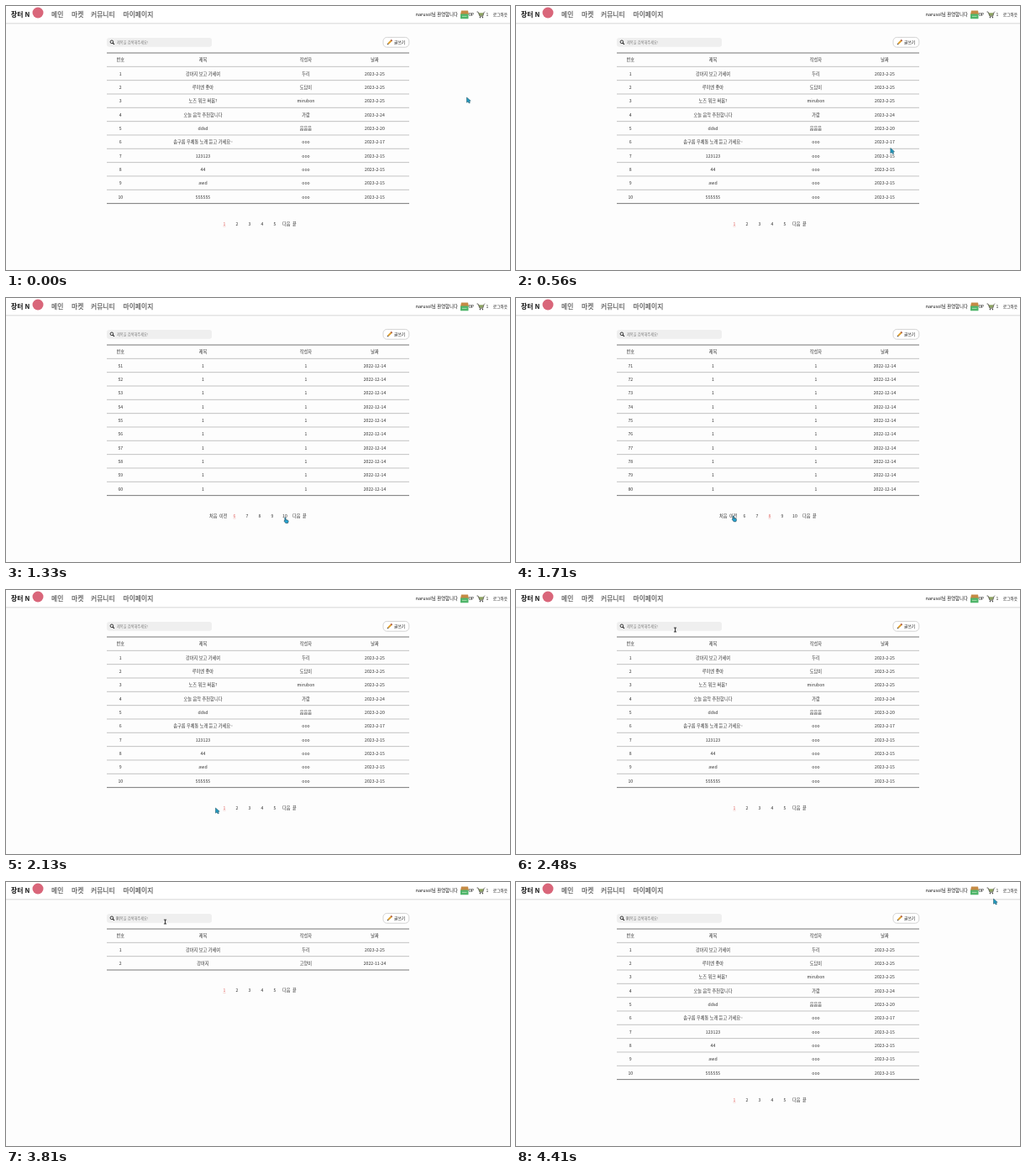
Animation, 600 px wide and 315 px high, one loop 4430 ms. Source, as an HTML page:

```html
<!DOCTYPE html>
<html lang="ko">
<head>
<meta charset="utf-8">
<title>게시판</title>
<style>
  html, body { margin: 0; width: 100%; height: 100%; overflow: hidden; background: #fdfdfd; }
  svg { display: block; width: 600px; height: 315px; }
  text { font-family: "Noto Sans CJK KR", "Noto Sans CJK", "Noto Sans", sans-serif; fill: #333; }
  .nav { font-weight: 900; fill: #707070; }
  .brand { font-weight: 900; fill: #111; }
  .bold { font-weight: 500; fill: #111; }
  .hint { fill: #808080; }
  .active { fill: #e0605c; }
</style>
</head>
<body>
<svg id="stage" viewBox="0 0 600 315">
  <rect width="600" height="20.5" fill="#fff"/>
  <path d="M0 20.8H600" stroke="#d8d8d8"/>
  <circle cx="38" cy="8" r="6.5" fill="#d9667a"/>

  <!-- wallet -->
  <path d="M542 5.5h8l1 4.5h-10z" fill="#c58a45"/>
  <rect x="541" y="9.5" width="9.5" height="5.8" rx=".6" fill="#4fb56a"/>
  <path d="M543 12.4h5.5" stroke="#a5dba9"/>

  <!-- cart -->
  <path d="M562.5 8.2h6l-1 3.6h-3.8z" fill="#8fa564"/>
  <path d="M560.5 7h1.5l2 5.2h3.6l1.5-4.6.9-1" fill="none" stroke="#4b4b43" stroke-width=".8"/>
  <circle cx="564.4" cy="13.6" r=".8" fill="#444"/>
  <circle cx="567.4" cy="13.6" r=".8" fill="#444"/>

  <!-- search field -->
  <rect x="120" y="38" width="125" height="10.8" rx="3" fill="#efefef"/>
  <circle cx="125.9" cy="42.8" r="1.8" fill="none" stroke="#222" stroke-width=".9"/>
  <path d="M127.2 44.2l1.7 1.7" stroke="#222" stroke-width="1.1"/>

  <!-- write button -->
  <rect x="449" y="37.4" width="30.8" height="11.8" rx="4.5" fill="#fff" stroke="#c9c9c9" stroke-width=".8"/>
  <path d="M455 45l4-4" stroke="#e0a030" stroke-width="2"/>
  <path d="M458.5 41.5l1-1" stroke="#a8584c" stroke-width="2"/>
  <path d="M453.8 46.2l.4-1.8 1.4 1.4z" fill="#333"/>

  <g id="labels"></g>
  <g id="views"></g>
  <g id="field"></g>

  <g id="cursor">
    <path id="arrow" d="M0 0V6.2L1.5 5 2.7 7 3.9 6.4 2.9 4.4 4.7 4.2Z" fill="#1f9ac0" stroke="#174a5c" stroke-width=".5"/>
    <path id="hand" d="M-.1.2q.7-.7 1.2.2V2.6l2.4.6q.9.3.7 1.3L3.6 6.6H.9L-1 4.1q.1-.9.9-.4Z" fill="#25a5d2" stroke="#173f50" stroke-width=".6"/>
    <path id="beam" d="M-1.6-2.4H1.6M0-2.4V2.4M-1.6 2.4H1.6" fill="none" stroke="#222" stroke-width=".9"/>
  </g>
</svg>

<script>
const LOOP = 4430, ROW = 16.33, TOP = 56, BLINK = 70;
const COLS = [136.3, 234.5, 357, 439];
const $ = id => document.getElementById(id);

function add(parent, tag, attrs) {
  const el = document.createElementNS('http://www.w3.org/2000/svg', tag);
  for (const key in attrs) el.setAttribute(key, attrs[key]);
  return parent.appendChild(el);
}

// y is the middle of the line of text
function label(parent, str, x, y, size, cls = '', anchor = 'middle') {
  const el = add(parent, 'text', {
    x, y: y + size * 0.36, 'font-size': size, class: cls, 'text-anchor': anchor
  });
  el.textContent = str;
  return el;
}

function rule(parent, y, color, width = 0.8) {
  add(parent, 'path', { d: `M120 ${y}H480`, stroke: color, 'stroke-width': width });
}

const labels = $('labels');
[['장터 N', 6, 'brand'], ['메인', 54, 'nav'], ['마켓', 78, 'nav'],
 ['커뮤니티', 101, 'nav'], ['마이페이지', 139.5, 'nav']]
  .forEach(([str, x, cls]) => label(labels, str, x, 10, 7.8, cls, 'start'));
label(labels, 'narusol님 환영합니다', 538, 10, 5.4, 'bold', 'end');
label(labels, '0P', 554, 10, 5.2, 'bold');
label(labels, '1', 573, 10, 5.2);
label(labels, '로그아웃', 588.5, 10, 4.7, 'bold');
label(labels, '글쓰기', 468.6, 43.2, 4.8, 'bold');

const firstRows = [
  ['강아지 보고 가세여', '두리', '2023-2-25'],
  ['루미엔 좋아', '도담이', '2023-2-25'],
  ['노즈 워크 써봄?', 'mirubon', '2023-2-25'],
  ['오늘 음악 추천합니다', '가람', '2023-2-24'],
  ['ddsd', '음음음', '2023-2-20'],
  ['솜구름 우체통 노래 듣고 가세요~', 'ooo', '2023-2-17'],
  ...['123123', '44', 'awd', '555555'].map(s => [s, 'ooo', '2023-2-15'])
];
const thirdRows = [
  ['plz', 'ooo', '2023-2-15'],
  ['!!!', 'ooo', '2023-2-15'],
  ['??', '??', '2023-2-15'],
  ['띠요용', '뿌우', '2023-2-14'],
  ['왜왜', '음', '2023-2-13'],
  ['버티는 거야', '참아', '2023-2-10'],
  ['11', '11', '2023-2-6'],
  ['test', 'test', '2023-1-23'],
  ['제목', '작성자', '2023-1-12'],
  ['마우스 팝니다!', '보람', '2023-1-10']
];
const plainRows = Array(10).fill(['1', '1', '2022-12-14']);
const foundRows = [firstRows[0], ['강아지', '고양이', '2022-11-24']];

function pageLinks(page) {
  const later = page > 5, shift = later ? 12 : 0, first = later ? 6 : 1;
  const links = [0, 1, 2, 3, 4].map(i => [String(first + i), 260 + shift + 15 * i]);
  links.push(['다음', 333.7 + shift], ['끝', 343.5 + shift]);
  if (later) links.unshift(['처음', 246.7], ['이전', 258.7]);
  return links;
}

function makeView(rows, page) {
  const group = add($('views'), 'g', {});
  const line = (cells, k) =>
    cells.forEach((str, i) => label(group, str, COLS[i], TOP + ROW * (k + 0.52), 5.2));

  line(['번호', '제목', '작성자', '날짜'], 0);
  rows.forEach((row, i) => {
    line([String((page - 1) * 10 + i + 1), ...row], i + 1);
    rule(group, TOP + ROW * (i + 1), '#b4b4b4');
  });
  const bottom = TOP + ROW * (rows.length + 1);
  rule(group, TOP, '#777', 1);
  rule(group, bottom, '#777', 1);

  const links = pageLinks(page), y = bottom + 24.4;
  for (const [str, x] of links) {
    const active = str === String(page);
    label(group, str, x, y, 5.2, active ? 'active' : '');
    if (active) add(group, 'path', { d: `M${x - 1.5} ${y + 3}h3`, stroke: '#e9a09c', 'stroke-width': 0.5 });
  }
  return { group, links, y };
}

const first = makeView(firstRows, 1), third = makeView(thirdRows, 3);
const sixth = makeView(plainRows, 6), eighth = makeView(plainRows, 8);
const found = makeView(foundRows, 1);
const views = [first, third, sixth, eighth, found];

// [start time, value]
const viewTimes = [[0, first], [850, third], [1170, sixth], [1560, eighth],
                   [1880, first], [3180, found], [3880, first]];
const typing = [[0, ''], ...['ㄱ', '가', '강', '강ㅇ', '강아', '강앚', '강아지']
  .map((s, i) => [2620 + i * 50, s]), [3180, '']];

// [time, x, y]
const path = [
  [0, 548.5, 109], [380, 548.5, 109], [800, 290, 261.5], [960, 290, 261.5],
  [1120, 332, 262], [1350, 332, 262], [1510, 302, 261], [1600, 302, 261],
  [1750, 249.5, 260], [2150, 249.5, 260], [2440, 189.5, 47.5], [3920, 189.5, 47.5],
  [4300, 566, 17], [4400, 568.5, 20], [LOOP, 568.5, 20]
];

const field = $('field');
const input = label(field, '', 132, 43.2, 4.2, 'hint', 'start');
const caret = add(field, 'path', { stroke: '#333', 'stroke-width': 0.6 });

const valueAt = (list, t) => list.filter(step => step[0] <= t).pop()[1];
const show = (el, on) => el.setAttribute('visibility', on ? 'visible' : 'hidden');

function cursorAt(t) {
  const i = path.findIndex(p => p[0] > t);
  const [t0, x0, y0] = path[i - 1], [t1, x1, y1] = path[i];
  const p = (t - t0) / (t1 - t0), e = p * p * (3 - 2 * p);
  return [x0 + (x1 - x0) * e, y0 + (y1 - y0) * e];
}

function draw(t) {
  const view = valueAt(viewTimes, t);
  views.forEach(v => show(v.group, v === view));

  const typed = valueAt(typing, t);
  input.textContent = typed || '제목을 검색해주세요!';
  input.style.fill = typed ? '#444' : '';
  const blink = Math.floor((t - 3810 + LOOP) / BLINK - LOOP / BLINK) % 2 === 0;
  const caretX = 132 + typed.length * 4.2 * 0.92;
  caret.setAttribute('d', `M${caretX + 0.1} 41v4.6`);
  show(caret, t >= 2450 && (typed ? t < 2970 : blink));

  const [x, y] = cursorAt(t);
  const inField = x > 120 && x < 245 && y > 38 && y < 49;
  const onLink = Math.abs(y - view.y) < 4 && view.links.some(link => Math.abs(link[1] - x) < 4);
  $('cursor').setAttribute('transform', `translate(${x} ${y})`);
  show($('beam'), inField);
  show($('hand'), onLink);
  show($('arrow'), !inField && !onLink);
}

const start = performance.now();
function tick() {
  draw((performance.now() - start) % LOOP);
  requestAnimationFrame(tick);
}
tick();
</script>
</body>
</html>
```
